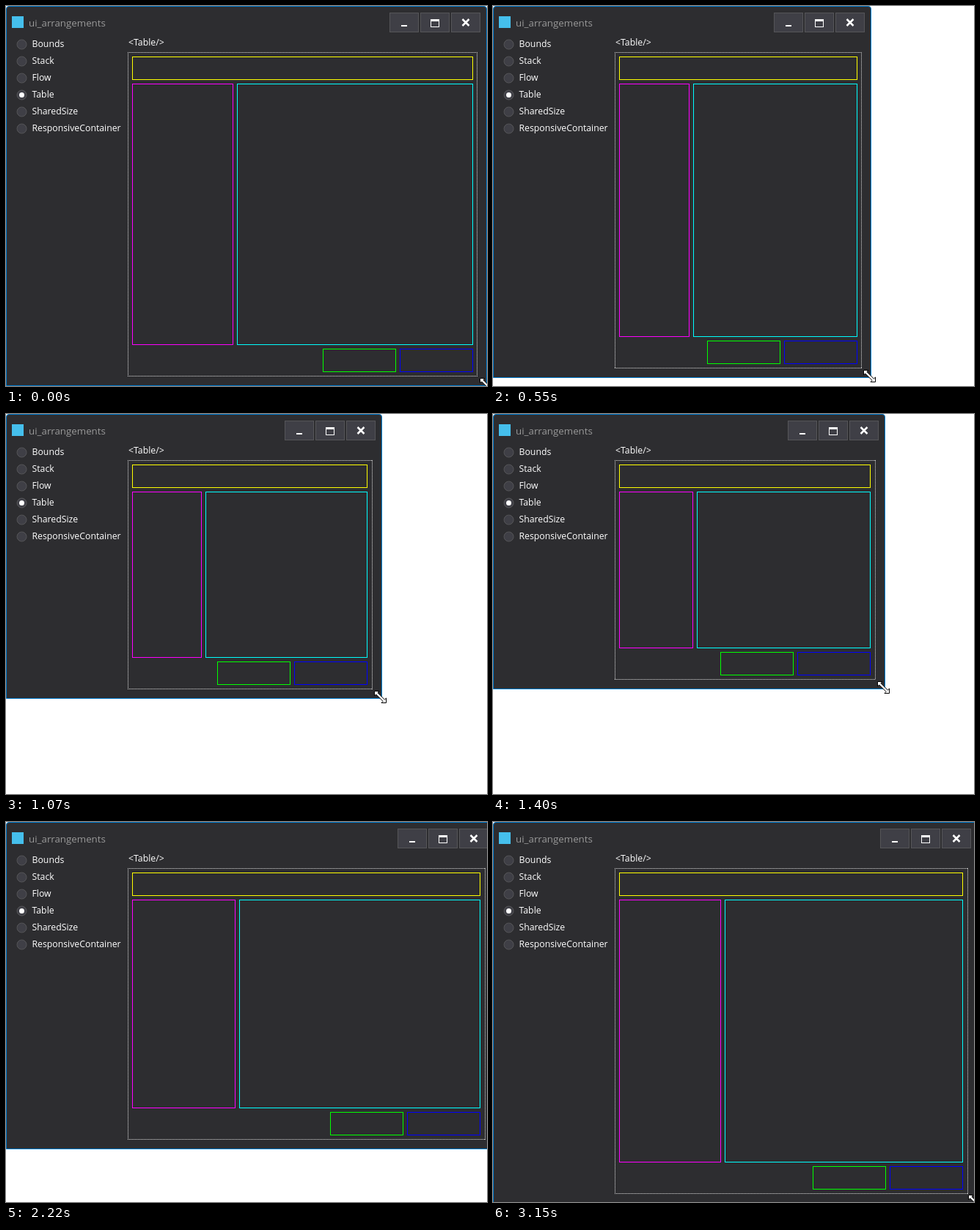
An HTML page that plays this animation: 656x519 px, repeating every 3200 ms.

```html
<!DOCTYPE html>
<html lang="en">
<head>
<meta charset="utf-8">
<title>Resizing a table layout</title>
<style>
html, body { margin: 0; width: 100%; height: 100%; overflow: hidden; background: #fff; }
#stage { position: relative; width: 656px; height: 519px; overflow: hidden; }
#stage * { box-sizing: border-box; }
#stage div, #stage svg { position: absolute; }
#win { left: 0; top: 0; background: #2d2d30; border: 1px solid #007acc; border-radius: 4px 4px 0 0; }
#labels { left: 0; top: 0; font: 12.27px "Open Sans", "Noto Sans", sans-serif; fill: #fff; }
#labels .title { font-size: 13.3px; fill: #999; }
.ring { fill: #3f3f46; stroke: #555558; }
.btn { top: 9px; width: 40px; height: 27px; background: #3f3f46; border: 1px solid #555558; }
.btn svg { left: -1px; top: -1px; }
#table {
  --h: repeating-linear-gradient(90deg, #ddd 0 1px, transparent 1px 2px);
  --v: repeating-linear-gradient(#ddd 0 1px, transparent 1px 2px);
  background: var(--h) top / 100% 1px, var(--h) bottom / 100% 1px,
    var(--v) left / 1px 100%, var(--v) right / 1px 100%;
  background-repeat: no-repeat;
}
.cell { border: 1px solid; }
</style>
</head>
<body>
<div id="stage">
  <div id="win"></div>
  <svg id="labels" width="656" height="200">
    <rect x="8" y="14" width="16" height="16" fill="#45bfec"/>
    <text class="title" x="31" y="28">ui_arrangements</text>
    <text x="167" y="54">&lt;Table/&gt;</text>
  </svg>
  <div class="btn"><svg width="40" height="27"><path d="M16 17h8v2h-8z" fill="#fff"/></svg></div>
  <div class="btn"><svg width="40" height="27"><path d="M14 9h12v11h-12zM15 12v7h10v-7z" fill="#fff" fill-rule="evenodd"/></svg></div>
  <div class="btn"><svg width="40" height="27"><path d="M15.5 9l9 9m0-9l-9 9" stroke="#fff" stroke-width="2.5"/></svg></div>
  <div id="table"></div>
  <div class="cell" style="color:#ff0"></div>
  <div class="cell" style="color:#f0f"></div>
  <div class="cell" style="color:#0ff"></div>
  <div class="cell" style="color:#0f0"></div>
  <div class="cell" style="color:#00f"></div>
  <svg id="cursor" width="17" height="17">
    <path d="M.5 .5H7L4.9 2.6L14.4 12.1L16.5 10V16.5H10L12.1 14.4L2.6 4.9L.5 7Z" fill="#fff" stroke="#000"/>
  </svg>
</div>
<script>
const LOOP = 3200;
const $ = id => document.getElementById(id);
const cells = document.querySelectorAll('.cell');
const buttons = document.querySelectorAll('.btn');

// Each drag: start time, gaps between steps (in 10 ms), keys of [step, width, height].
const drags = [
  { start: 230, gaps: '4444444454',
    keys: [[-1, 656, 519], [1, 637, 518], [6, 531, 510], [8, 516, 508], [10, 524, 507]] },
  { start: 770, gaps: '445445444454',
    keys: [[-1, 524, 507], [1, 521, 490], [4, 516, 430], [7, 513, 389], [12, 514, 376]] },
  { start: 1330, gaps: '444444445',
    keys: [[-1, 514, 376], [1, 535, 376], [6, 640, 377], [9, 667, 377]] },
  { start: 1880, gaps: '445444545445',
    keys: [[-1, 667, 377], [1, 667, 388], [8, 667, 447], [12, 667, 501]] },
  { start: 2440, gaps: '455555',
    keys: [[-1, 667, 501], [0, 666, 507], [1, 665, 512], [6, 661, 521]] }
];

const options = ['Bounds', 'Stack', 'Flow', 'Table', 'SharedSize', 'ResponsiveContainer'];
$('labels').insertAdjacentHTML('beforeend', options.map((name, i) => {
  const y = 52.5 + i * 23;
  const dot = name === 'Table' ? `<circle cx="21.5" cy="${y}" r="3.5"/>` : '';
  return `<circle class="ring" cx="21.5" cy="${y}" r="6.5"/>${dot}<text x="35.5" y="${y + 3.5}">${name}</text>`;
}).join(''));

function place(el, x, y, w, h) {
  Object.assign(el.style, { left: x + 'px', top: y + 'px', width: w + 'px', height: h + 'px' });
}

function sizeAt(t) {
  const drag = drags.filter(d => d.start <= t).pop();
  if (!drag) return [656, 519];
  let step = 0, time = drag.start;
  for (const gap of drag.gaps) {
    time += gap * 10;
    if (time > t) break;
    step++;
  }
  const i = drag.keys.findIndex(k => k[0] >= step);
  const a = drag.keys[i - 1], b = drag.keys[i];
  const p = (step - a[0]) / (b[0] - a[0]);
  return [1, 2].map(n => Math.round(a[n] + (b[n] - a[n]) * p));
}

function cursorAt(t, w, h) {
  if (t < 230) return [646, 508];
  if (t >= 3150) return [648, 509];
  if (t >= 2970) return [651, 510];
  if (t >= 2730) return [652, 511];
  return [w - 11, h - 11];
}

function layout(w, h) {
  place($('win'), 0, 0, w, h);
  buttons.forEach((b, i) => b.style.left = w - 133 + i * 42 + 'px');
  place($('table'), 166, 63, w - 179, h - 76);

  // Columns share the free width 30 : 70, each rounded down.
  const free = w - 196;
  const left = Math.floor(free * 3 / 10), main = Math.floor(free * 7 / 10);
  const right = 177 + left + main;
  place(cells[0], 172, 69, right - 172, 32);
  place(cells[1], 172, 106, left, h - 162);
  place(cells[2], 177 + left, 106, main, h - 162);
  place(cells[3], right - 205, h - 51, 100, 32);
  place(cells[4], right - 100, h - 51, 100, 32);
}

const origin = performance.now();
function draw() {
  const t = (performance.now() - origin) % LOOP;
  const [w, h] = sizeAt(t);
  layout(w, h);
  place($('cursor'), ...cursorAt(t, w, h), 17, 17);
  requestAnimationFrame(draw);
}
draw();
</script>
</body>
</html>
```
